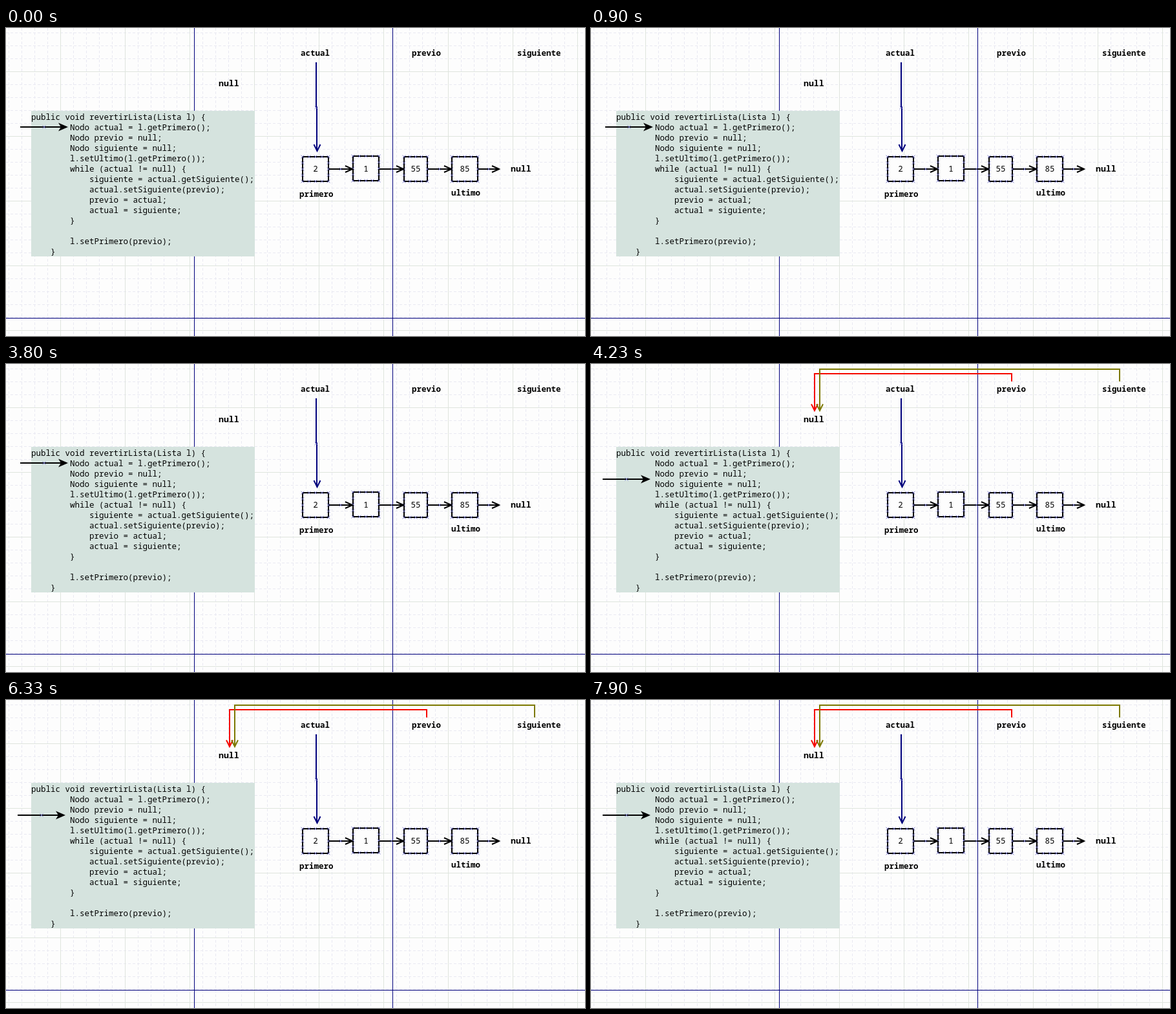
These frames come from a looping animation (896x476 px, 8 s). An HTML page:

```html
<!DOCTYPE html>
<html lang="es">
<head>
<meta charset="utf-8">
<style>
html, body { margin: 0; width: 100%; height: 100%; overflow: hidden; background: #fdfdfd; }
svg { display: block; width: 896px; height: 476px; }
text { font: 12.5px "Noto Sans Mono", "DejaVu Sans Mono", monospace; fill: #000; white-space: pre; }
.label { font-weight: 700; }
.big { font-size: 13.2px; }
.mid { text-anchor: middle; }
</style>
</head>
<body>
<svg id="stage" viewBox="0 0 896 476" xmlns="http://www.w3.org/2000/svg"></svg>
<script>
const LOOP = 8000, SWITCH = 4100;
const NAVY = '#00007c';
const stage = document.getElementById('stage');

function add(tag, attrs, parent = stage, text) {
  const el = document.createElementNS('http://www.w3.org/2000/svg', tag);
  for (const k in attrs) el.setAttribute(k, attrs[k]);
  if (text !== undefined) el.textContent = text;
  parent.append(el);
  return el;
}
const stroke = (d, color, width, parent, extra) =>
  add('path', { d, fill: 'none', stroke: color, 'stroke-width': width, ...extra }, parent);
const label = (x, y, s, cls = '') => add('text', { x, y, class: cls }, stage, s);

// Small x marking a connection point
const cross = (x, y, parent) =>
  stroke(`M${x - 2.5} ${y - 2.5}l5 5m0 -5l-5 5`, '#6c6cc4', 1, parent, { opacity: .8 });

function drawGrid() {
  const line = (d, major) => stroke(d, major ? '#dfe5de' : '#e9e9f2', 1, stage,
    major ? {} : { 'stroke-dasharray': '4 3' });
  for (const major of [false, true]) {
    for (let i = 0; i < 45; i++)
      if ((i % 5 === 4) === major) line(`M${4.5 + i * 20} 0V476`, major);
    for (let i = 0; i < 24; i++)
      if ((i % 5 === 3) === major) line(`M0 ${7.5 + i * 20}H896`, major);
  }
  stroke('M291.5 0V476M598.5 0V476M0 448.5H896', NAVY, 1);
}

function drawCode() {
  add('rect', { x: 39, y: 128, width: 346, height: 225, fill: '#d5e3de' });
  [
    [0, 'public void revertirLista(Lista l) {'],
    [8, 'Nodo actual = l.getPrimero();'],
    [8, 'Nodo previo = null;'],
    [8, 'Nodo siguiente = null;'],
    [8, 'l.setUltimo(l.getPrimero());'],
    [8, 'while (actual != null) {'],
    [12, 'siguiente = actual.getSiguiente();'],
    [12, 'actual.setSiguiente(previo);'],
    [12, 'previo = actual;'],
    [12, 'actual = siguiente;'],
    [8, '}'],
    [0, ''],
    [8, 'l.setPrimero(previo);'],
    [4, '}']
  ].forEach(([indent, s], i) => label(39 + indent * 7.5, 142 + i * 16, s));
}

function drawNode(x, y, w, value) {
  const h = 38;
  add('rect', { x, y, width: w, height: h, fill: '#fdfdfd', stroke: '#000', 'stroke-width': 2 });
  for (let i = 0; i <= 4; i++) {
    const px = x + w * i / 4, py = y + h * i / 4;
    cross(px, y); cross(px, y + h);
    if (i % 4) { cross(x, py); cross(x + w, py); }
  }
  label(x + w / 2, 222, value, 'mid');
}

function drawLink(x1, x2) {
  const y = 218;
  stroke(`M${x1} ${y}H${x2}M${x2 - 11} ${y - 5}L${x2} ${y}L${x2 - 11} ${y + 5}`, '#000', 2);
  cross((x1 + x2) / 2, y);
}

const downHead = (x, y) => `M${x - 5} ${y - 10}L${x} ${y}L${x + 5} ${y - 10}`;

// Elbow from a label over the top and down to null
const drawElbow = (from, top, to, color, parent) =>
  stroke(`M${from} 27V${top}H${to}V72${downHead(to, 72)}`, color, 2, parent);

drawGrid();
drawCode();

label(456, 43, 'actual', 'label');
label(628, 43, 'previo', 'label');
label(791, 43, 'siguiente', 'label');
label(329, 90, 'null', 'label big');
label(781, 222, 'null', 'label big');
label(454, 261, 'primero', 'label');
label(689, 259, 'ultimo', 'label');

drawNode(459, 199, 40, '2');
drawNode(537, 198, 40, '1');
drawNode(616, 199, 36, '55');
drawNode(690, 199, 40, '85');
drawLink(500, 536);
drawLink(578, 615);
drawLink(653, 689);
drawLink(731, 763);

stroke('M479 54H480V122H481V190' + downHead(481.5, 190), NAVY, 2);
cross(480, 123);

const pointers = add('g', {});
drawElbow(651, 15, 346, '#f60800', pointers);
drawElbow(818, 8, 354, '#7c7800', pointers);

const cursor = add('g', {});
stroke('M22 153H86', '#000', 2, cursor);
add('path', { d: 'M96 153L81 146.5L85 153L81 159.5Z' }, cursor);
cross(59, 153, cursor);

function frame() {
  const second = performance.now() % LOOP >= SWITCH;
  pointers.setAttribute('visibility', second ? 'visible' : 'hidden');
  cursor.setAttribute('transform', second ? 'translate(-4 25)' : 'translate(0 0)');
  requestAnimationFrame(frame);
}
frame();
</script>
</body>
</html>
```
